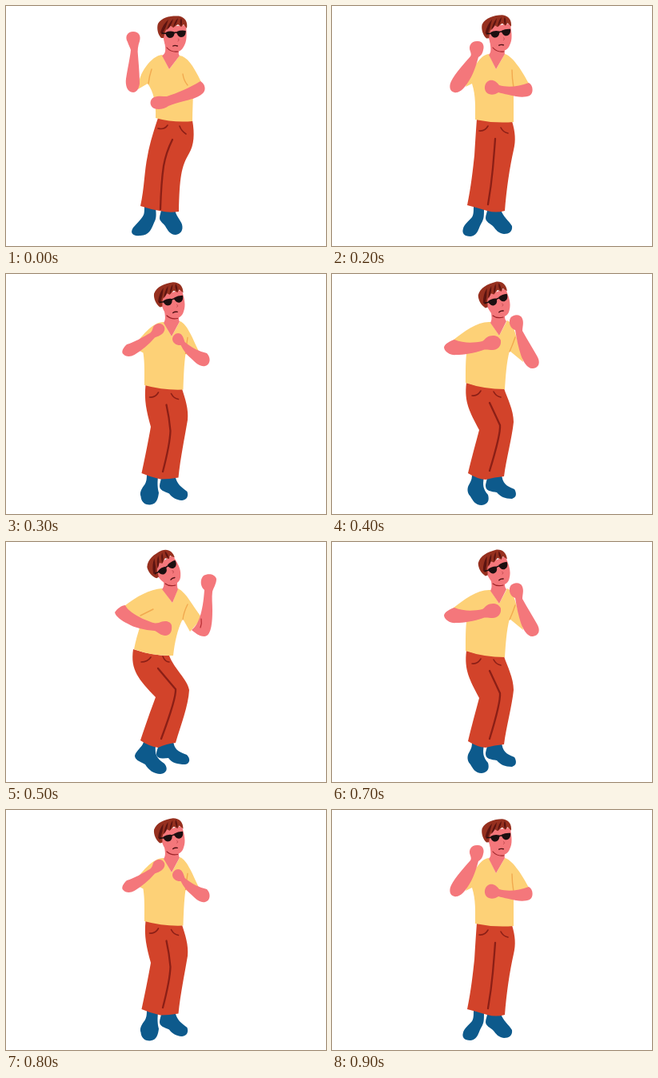
An HTML page that plays this animation: 400x300 px, repeating every 1000 ms.

```html
<!DOCTYPE html>
<html lang="en">
<head>
<meta charset="utf-8">
<title>Dancer</title>
<style>
  html, body { margin: 0; width: 100%; height: 100%; overflow: hidden; background: #fff; }
  svg { display: block; width: 400px; height: 300px; }
  .line { fill: none; stroke-linecap: round; stroke-linejoin: round; }
</style>
</head>
<body>
<svg viewBox="0 0 400 300">
  <g id="body"></g>
  <g id="head">
    <path fill="#f4777b" d="M196 26L225 24C226 36 226.500 44 222 51C219 57 214 58 208 57C203 55 198 49 197 41Z"/>
    <path fill="#96301f" d="M194 40C190 36 188 28 190 22C195 14 205 12 216 12.500C224 14 227.500 20 226 28L222 23L219 26L215 23L209 27L206 25L200 30C198 33 198 37 197 40Z"/>
    <path fill="#5c1411" d="M203 17Q196 23 193 33L195 36Q200 27 203 17ZM209 16Q203 22 201 30Q207 25 209 16ZM215 15Q210 20 209 27Q214 22 215 15ZM219 15Q216 20 219 26Q221 20 219 15Z"/>
    <path class="line" stroke="#1c0f10" stroke-width="1.5" d="M195.500 34L201 34.500M210 34Q212 32.500 214 33.500"/>
    <path fill="#1c0f10" d="M199.500 33Q205 30.500 210.500 32.500C211 37 208.500 40 205 40C202 40 199.500 37 199.500 33ZM213.500 32Q219 29.800 224.800 31C225 36 222.500 39 219 39C216 39 213.500 36 213.500 32Z"/>
    <path class="line" stroke="#c04a50" stroke-width=".9" d="M215.500 41Q217.500 43 215 44"/>
    <path class="line" stroke="#4d1114" stroke-width="1.4" d="M208.700 50Q211 48.800 214.300 50"/>
  </g>
</svg>
<script>
const SKIN = '#f4777b', DARK = '#8b1f16', BLUE = '#0d5a8c';

// Painted in this order; a width makes the part a stroke.
const PARTS = [
  ['shoeL', BLUE], ['shoeR', BLUE],
  ['trousers', '#d2432a'], ['crease', DARK, 2.3], ['pockets', DARK, 1.6],
  ['shirt', '#fdd177'], ['seams', '#f2a94f', 1.4],
  ['neck', SKIN], ['jaw', '#9c2228', 1.1],
  ['armL', SKIN], ['armR', SKIN], ['fold', '#b32a30', 1.2]
];

// head: dx, dy, angle around the mouth
const raised = {
  head: '0 0 0',
  shoeL: 'M173 250L187 252C188 261 188 266 185 271C182 278 179 287 168 287C157 288 155 283 159 277C163 272 168 268 171 263C173 260 173 257 173 250Z',
  shoeR: 'M194 254L211 254C212 262 218 267 220 273C222 281 218 285 212 286C205 286 202 280 199 275C196 271 192 269 192 265C192 261 194 258 194 254Z',
  trousers: 'M190 140Q210 144 233 143C236 160 235 174 229 184C219 201 217 214 216 257Q204 259 192 256Q180 254 168 250C173 228 173 205 177 187C180 170 186 152 190 140Z',
  crease: 'M208 167Q200 183 197 200Q194 220 193 254',
  pockets: 'M190 153Q198 155 202 149M217 150Q219 156 225 160',
  shirt: 'M195 61L204 79L217 62C226 63 234 74 244 95L234 100L234 102C234 115 233 130 233 144Q209 146 187 140C188 122 184 106 177 97L165 104C165 84 182 62 195 61Z',
  seams: 'M221 85Q222 93 227 99M182 79Q179 88 178 97',
  neck: 'M198 45C200 54 200 60 195 62L204 79L217 62C215 60 216 57 217 54Z',
  jaw: 'M201 52Q206 58 215 57',
  armL: 'M152 45C148 38 152 32 159 32C166 32 169 37 167 44C165 50 164 55 165 62C166 75 167 85 167 97C166 104 163 108 159 108C151 108 149 98 150 91C152 78 155 65 156 55C155 52 153 48 152 45Z',
  armR: 'M243 94C249 97 251 106 245 110C239 115 230 117 222 119C214 121 208 123 203 125C198 129 190 130 185 128C179 125 179 117 185 114C190 112 196 113 201 113C214 109 230 102 243 94Z',
  fold: ''
};

const upright = {
  head: '0 -1 -5',
  shoeL: 'M177 250L190 253C190 262 190 266 187 271C183 277 183 287 173 288C165 288 162 284 164 278C165 273 171 269 175 264C177 261 177 257 177 250Z',
  shoeR: 'M194 255L211 254C213 263 221 268 225 275C226 282 221 285 215 285C208 284 205 280 202 276C198 272 192 270 192 265C192 261 194 258 194 255Z',
  trousers: 'M181 141Q203 145 225 144C229 157 230 168 227 180C222 202 218 230 216 256Q205 259 194 256Q181 252 169 249C174 225 176 205 178 187C179 170 180 155 181 141Z',
  crease: 'M204 166Q203 180 201 203Q199 225 195 248',
  pockets: 'M184 156Q191 157 195 150M211 152Q214 158 220 159',
  shirt: 'M196 60L205 79L216 60C224 62 235 76 246 97L227 102L227 103C227 116 227 130 227 145Q203 147 179 142C179 128 180 112 175 97L167 101C172 86 183 61 196 60Z',
  seams: 'M225 80Q225 90 227 102',
  neck: 'M197 43C199 54 199 58 196 61L205 79L216 60C215 58 216 55 217 52Z',
  jaw: 'M201 52Q206 58 215 57',
  armL: 'M173 57C170 50 174 44 181 44C188 43 191 49 189 55C188 60 186 62 183 64C179 78 175 90 166 101C162 106 157 109 153 108C147 107 146 100 149 94C154 84 165 72 173 63C174 61 174 60 173 57Z',
  armR: 'M246 96C252 99 252 110 247 112C243 114 236 114 230 113C220 111 212 109 208 108C204 111 197 112 193 108C189 103 191 95 197 93C202 92 206 95 209 99C219 102 233 101 246 96Z',
  fold: ''
};

const bent = {
  head: '0 -3 -17',
  shoeL: 'M175 250L190 254C188 264 189 269 195 276C197 283 195 288 187 289C179 289 176 283 173 278C168 273 169 266 172 262C174 258 175 256 175 250Z',
  shoeR: 'M194 252L212 250C213 262 218 265 228 269C231 274 231 279 225 281C216 281 210 278 206 273C199 272 192 271 192 265C192 261 194 258 194 252Z',
  trousers: 'M168 136Q190 143 215 143C219 155 227 170 227 185C225 205 218 230 215 253Q203 254 192 257Q181 256 170 249C174 232 180 210 184 195C172 172 165 160 168 136Z',
  crease: 'M197 161Q205 178 210 189Q211 200 197 246',
  pockets: 'M175 152Q182 153 186 146M202 147Q205 153 211 154',
  shirt: 'M198 60L209 77L219 58C229 63 230 82 237 98L239 110L222 96C218 110 217 130 216 144Q190 144 167 136C167 120 167 110 168 100L151 83C165 72 182 59 198 60Z',
  seams: 'M229 79Q226 88 222 97',
  neck: 'M198 44C200 54 200 57 198 61L209 77L218 59C216 57 216 55 216 51Z',
  jaw: 'M201 52Q206 56 214 54',
  armL: 'M194 79C199 76 208 76 211 83C212 91 206 95 201 95C196 95 192 94 189 95C177 99 165 101 155 101C149 102 141 98 140 92C140 88 147 84 153 82C165 87 178 86 188 84C190 83 192 80 194 79Z',
  armR: 'M256 102C261 110 259 117 251 118C245 119 239 110 236 101C233 92 231 82 229 70C223 68 220 61 223 55C227 50 236 50 238 56C240 61 238 66 238 71C244 82 251 93 256 102Z',
  fold: ''
};

const leaning = {
  head: '-3 -4 -28',
  shoeL: 'M172 250L187 254C186 266 188 270 198 277C203 283 201 289 193 290C185 290 178 285 174 278C166 274 161 272 161 267C163 260 170 257 172 250Z',
  shoeR: 'M191 250L209 248C210 259 215 262 226 266C231 271 230 277 224 278C214 278 207 276 203 270C196 271 188 271 188 265C188 260 191 257 191 250Z',
  trousers: 'M159 134Q183 142 204 142C210 158 227 172 229 185C228 205 218 230 212 251Q201 252 190 257Q178 255 168 248C174 230 181 210 187 194C166 172 155 160 159 134Z',
  crease: 'M190 158Q206 177 212 184Q213 195 194 246',
  pockets: 'M169 150Q177 150 181 144M196 143Q199 150 204 150',
  shirt: 'M195 58L208 76L215 58C226 64 232 78 245 95L230 112L221 96C214 110 211 125 209 142Q184 143 160 134C162 123 165 114 167 107L148 80C163 68 180 59 195 58Z',
  seams: 'M227 78Q222 88 221 97M168 92Q176 88 184 84',
  neck: 'M196 45C198 52 198 56 195 59L208 76L215 59C214 57 214 55 214 51Z',
  jaw: 'M199 52Q204 56 212 54',
  armL: 'M191 101C197 98 205 98 207 104C208 112 205 117 199 117C194 117 190 113 186 111C173 110 160 107 152 102C145 99 137 93 136 88C139 83 145 79 149 79C154 89 172 97 184 101C187 102 189 101 191 101Z',
  armR: 'M258 85C258 103 256 118 248 118C241 118 236 113 232 110C241 103 246 88 248 60C243 56 242 47 247 42C253 39 261 40 263 46C263 52 260 56 258 62C257 70 258 77 258 85Z',
  fold: 'M244 96Q245 102 243 107'
};

const NUM = /-?\d+(\.\d+)?/g;

function halfway(a, b) {
  const pose = {};
  for (const key in a) {
    const other = b[key].match(NUM);
    let i = 0;
    pose[key] = a[key].replace(NUM, n => (+n + +other[i++]) / 2);
  }
  return pose;
}

const passing = halfway(upright, bent);
const LOOP = 1000;
const STEPS = [
  [0, raised], [200, upright], [300, passing], [400, bent],
  [500, leaning], [700, bent], [800, passing], [900, upright]
];

const body = document.getElementById('body');
const head = document.getElementById('head');
const paths = {};

for (const [name, color, width] of PARTS) {
  const path = document.createElementNS('http://www.w3.org/2000/svg', 'path');
  path.setAttribute(width ? 'stroke' : 'fill', color);
  if (width) {
    path.setAttribute('class', 'line');
    path.setAttribute('stroke-width', width);
  }
  paths[name] = body.appendChild(path);
}
// The jaw line lies over the face.
head.after(paths.jaw);

let shown;

function show(pose) {
  if (pose === shown) return;
  shown = pose;
  for (const name in paths) paths[name].setAttribute('d', pose[name]);
  const [dx, dy, angle] = pose.head.split(' ');
  head.setAttribute('transform', `translate(${dx} ${dy}) rotate(${angle} 211 50)`);
}

function tick() {
  const t = performance.now() % LOOP;
  show(STEPS.filter(([start]) => start <= t).pop()[1]);
  requestAnimationFrame(tick);
}
tick();
</script>
</body>
</html>
```
